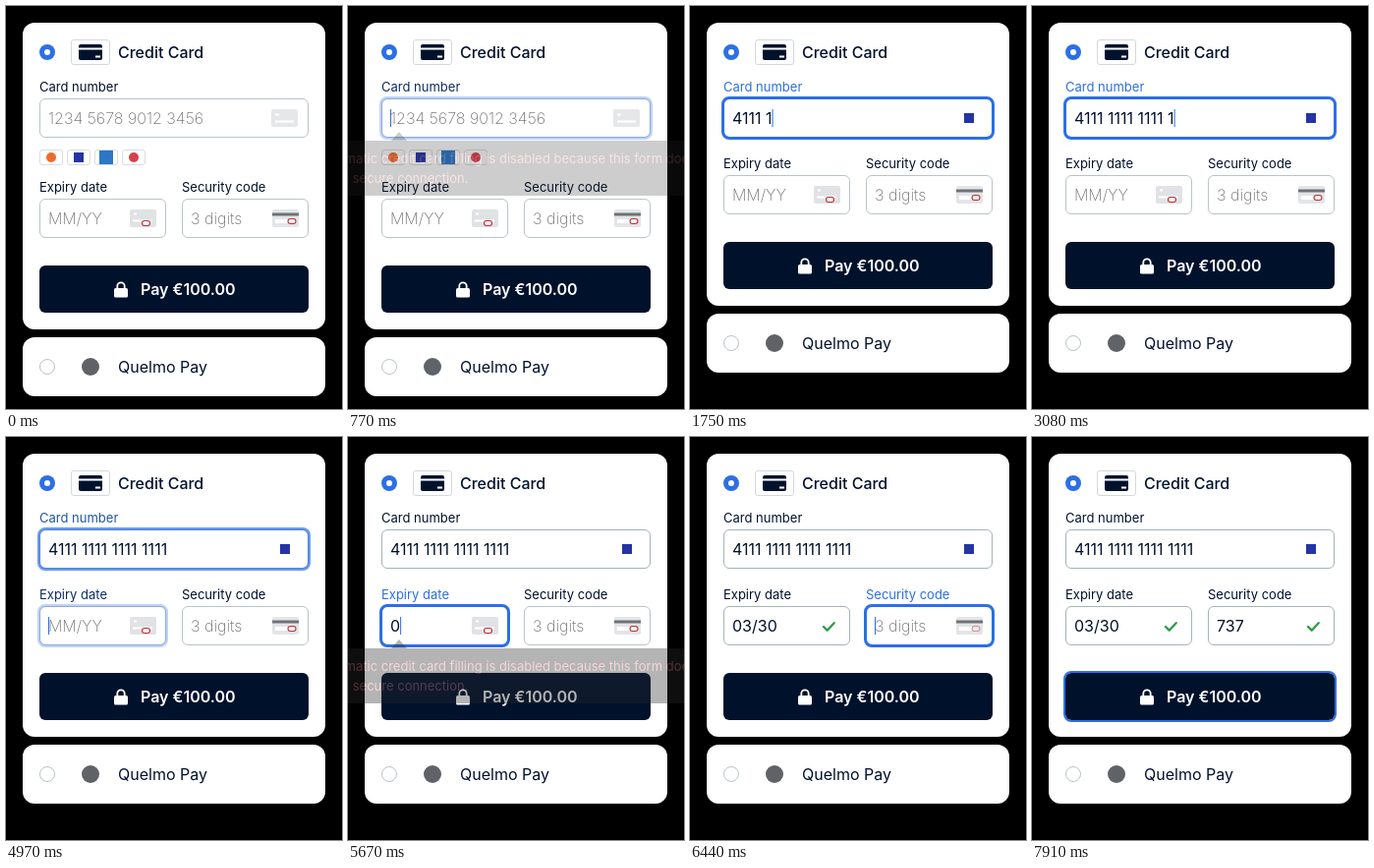
These frames come from a looping animation (342 by 410 pixels, 8000 ms). An HTML page:

```html
<!DOCTYPE html>
<html lang="en">
<head>
<meta charset="utf-8">
<title>Card payment form</title>
<style>
  :root { --ink: #00112c; --blue: #2c6fe6; --line: #b9c4c9; }
  html, body { margin: 0; width: 100%; height: 100%; overflow: hidden; background: #000; }
  svg { display: block; width: 342px; height: 410px; font: 400 16px Inter, sans-serif; }
  text { fill: var(--ink); white-space: pre; }
  .title { font-weight: 500; }
  .label { font-size: 13px; }
  .hint { fill: #707070; font-weight: 200; }
  .box { fill: #fff; stroke: var(--line); }
  .ring { fill: none; stroke: var(--blue); stroke-width: 3; }
  .caret { fill: var(--blue); }
  .mark { fill: none; stroke: #c22f36; stroke-width: 1.1; }
  .check { fill: none; stroke: #2f9e44; stroke-width: 2.4; stroke-linecap: round; stroke-linejoin: round; }
  .tip text { fill: #ea8a8c; font-size: 13px; }
</style>
</head>
<body>
<svg viewBox="0 0 342 410">
  <rect id="panel" x="17" y="17" width="308" height="312" rx="12" fill="#fff"/>

  <circle cx="42" cy="47" r="8" fill="var(--blue)"/>
  <circle cx="42" cy="47" r="3" fill="#fff"/>
  <rect x="66.5" y="34.5" width="39" height="25" rx="2.5" fill="#fff" stroke="#d3d8dd"/>
  <rect x="74" y="39" width="24" height="16" rx="2" fill="var(--ink)"/>
  <path d="M74 43.5h24M91 51.5h5" stroke="#fff" stroke-width="2"/>
  <text class="title" x="114" y="53">Credit Card</text>

  <g id="brands">
    <g fill="#fff" stroke="#d9dde1">
      <rect x="34.5" y="146.500" width="23" height="15" rx="2.500"/>
      <rect x="62.5" y="146.500" width="23" height="15" rx="2.500"/>
      <rect x="90.5" y="146.500" width="23" height="15" rx="2.500"/>
      <rect x="118.5" y="146.500" width="23" height="15" rx="2.500"/>
    </g>
    <circle cx="46" cy="154" r="5" fill="#ee6a2c"/>
    <rect x="69" y="149" width="10" height="10" fill="#2434a4"/>
    <rect x="95" y="147" width="14" height="14" fill="#2a78c6"/>
    <circle cx="130" cy="154" r="5" fill="#d8404c"/>
  </g>

  <g id="number"></g>

  <g id="lower">
    <g id="expiry"></g>
    <g id="code"></g>
    <rect x="34" y="264" width="274" height="48" rx="6" fill="var(--ink)"/>
    <rect id="payRing" class="ring" x="33" y="263" width="276" height="50" rx="7" style="stroke-width:2"/>
    <rect x="110" y="287" width="14" height="9.500" rx="1.500" fill="#fff"/>
    <path d="M113.300 288v-3a3.700 3.700 0 0 1 7.400 0v3" fill="none" stroke="#fff" stroke-width="1.800"/>
    <text x="137" y="294" style="fill:#fff;font-weight:600">Pay €100.00</text>

    <rect x="17" y="337" width="308" height="60" rx="12" fill="#fff"/>
    <circle cx="42" cy="367" r="7.500" class="box"/>
    <circle cx="86" cy="367" r="9" fill="#5f6368"/>
    <text x="114" y="373">Quelmo Pay</text>
  </g>

  <g id="tip" class="tip">
    <path d="M0 137H44L52 128L60 137H342V193H0Z" fill="#2a2a2c"/>
    <text x="-32" y="160">Automatic credit card filling is disabled because this form does not</text>
    <text x="-32" y="180">use a secure connection.</text>
  </g>
</svg>
<script>
const LOOP = 8000, STEP = 70, COLLAPSE = 24;
const $ = id => document.getElementById(id);
const clamp = v => Math.min(1, Math.max(0, v));
const ramp = (t, start, length) => clamp((t - start) / length);
const pulse = (t, start, end, rise, fall) => ramp(t, start, rise) - ramp(t, end, fall);

// Last [time, value] entry reached at t.
const latest = (table, t) => table.filter(row => row[0] <= t).pop();

const cardText = count => {
  const digits = '4' + '1'.repeat(count - 1);
  const grouped = digits.replace(/\d{4}/g, '$& ');
  return count === 16 ? grouped.trim() : grouped;
};

const cardBase = (x, y, fill) => `<rect x="${x}" y="${y}" width="27" height="18" rx="2" fill="${fill}"/>`;
const checkAt = (x, y) => `<path class="check" d="M${x - 5} ${y + 0.5}l3.700 3.700l7-7.500"/>`;

const fields = [
  {
    id: 'number', label: 'Card number', hint: '1234 5678 9012 3456',
    x: 34, y: 94, width: 274, focus: 710, blur: 4910, done: 1260,
    keys: [[1260, 2], [1400, 3], [1540, 4], [1750, 5], [1960, 6], [2100, 7], [2240, 8],
      [2380, 9], [2520, 10], [2730, 11], [3010, 12], [3080, 13], [3360, 14], [3640, 15],
      [3780, 16], [3920, 17], [4620, 16]].map(([time, count]) => [time, cardText(count)]),
    icon: cardBase(270, 105, '#e5e7e9') +
      '<path d="M274 110.500h4M274 117.500h19" stroke="#fff" stroke-width="2"/>',
    doneIcon: '<rect x="279" y="109" width="10" height="10" fill="#2434a4"/>'
  },
  {
    id: 'expiry', label: 'Expiry date', hint: 'MM/YY',
    x: 34, y: 196, width: 129, focus: 4910, blur: 6100, done: 6160,
    keys: [[5670, '0'], [5810, '03/'], [5950, '03/3'], [6090, '03/30']],
    icon: cardBase(126, 207, '#e0e2e5') +
      '<path d="M130 211.500h3M129 218.500h20" stroke="#fff" stroke-width="2"/>' +
      '<rect class="mark" x="138.500" y="218.500" width="8" height="5" rx="2.500" style="fill:#f4f4f5"/>',
    doneIcon: checkAt(141, 216.5)
  },
  {
    id: 'code', label: 'Security code', hint: '3 digits',
    x: 179, y: 196, width: 129, focus: 6100, blur: 7570, done: 7490,
    keys: [[6930, '7'], [7210, '73'], [7420, '737']],
    icon: cardBase(271, 207, '#e3e5e7') +
      '<path d="M271 212h27" stroke="#6d7278" stroke-width="3"/>' +
      '<path d="M274 219h13" stroke="#fff" stroke-width="4"/>' +
      '<rect class="mark" x="287" y="216.500" width="8" height="5" rx="2.500" style="fill:#f4f4f5"/>',
    doneIcon: checkAt(286, 216.5)
  }
];

for (const f of fields) {
  const root = $(f.id);
  root.innerHTML = `
    <text class="label" x="${f.x}" y="${f.y - 7}">${f.label}</text>
    <rect class="box" x="${f.x + 0.5}" y="${f.y + 0.5}" width="${f.width - 1}" height="39" rx="5.500"/>
    <rect class="ring" x="${f.x - 0.5}" y="${f.y - 0.5}" width="${f.width + 1}" height="41" rx="6.500"/>
    <g class="icon">${f.icon}</g><g class="doneIcon">${f.doneIcon}</g>
    <text class="value" x="${f.x + 9}" y="${f.y + 26}"></text>
    <rect class="caret" y="${f.y + 11}" width="1" height="18"/>`;
  f.part = name => root.querySelector('.' + name);
}

function drawField(f, t) {
  const typed = latest(f.keys, t);
  const text = typed ? typed[1] : '';
  const value = f.part('value');
  value.textContent = text || f.hint;
  value.classList.toggle('hint', !text);

  const glow = pulse(t, f.focus, f.blur, 200, 200);
  f.part('ring').style.opacity = glow;
  f.part('label').style.fill = `color-mix(in srgb, var(--blue) ${glow * 100}%, var(--ink))`;

  const done = t >= f.done;
  f.part('icon').style.opacity = done ? 0 : 1;
  f.part('doneIcon').style.opacity = done ? 1 : 0;
  f.part('box').style.stroke = done && t >= f.blur ? '#a3b3b8' : 'var(--line)';

  // The caret blinks, restarting with every key.
  const focused = t >= f.focus && t < f.blur;
  const sinceKey = t - (typed ? typed[0] : f.focus);
  const caret = f.part('caret');
  caret.style.opacity = focused && sinceKey % 1000 < 500 ? 1 : 0;
  caret.setAttribute('x', f.x + 9 + (text ? value.getComputedTextLength() : 0));
}

function draw(t) {
  fields.forEach(f => drawField(f, t));

  const code = fields[2];
  const wave = t > code.focus ? 0.5 - 0.5 * Math.cos((t - code.focus) / 500 * Math.PI) : 0;
  code.part('mark').style.opacity = 1 - 0.7 * wave;

  const shrink = 1 - (1 - ramp(t, 1200, 380)) ** 2;
  const offset = Math.round(COLLAPSE * shrink);
  $('panel').setAttribute('height', 312 - offset);
  $('lower').setAttribute('transform', `translate(0 ${-offset})`);
  $('brands').style.opacity = 1 - shrink;

  const late = t > 4000;
  $('tip').setAttribute('transform', `translate(0 ${late ? 78 : 0})`);
  $('tip').style.opacity = late ? pulse(t, 5600, 5900, 200, 180) : pulse(t, 710, 1400, 260, 200);
  $('payRing').style.opacity = ramp(t, 7570, 300);
}

function frame() {
  const t = performance.now() % LOOP;
  draw(Math.min(Math.floor(t / STEP) * STEP, 7910));
  requestAnimationFrame(frame);
}
frame();
</script>
</body>
</html>
```
